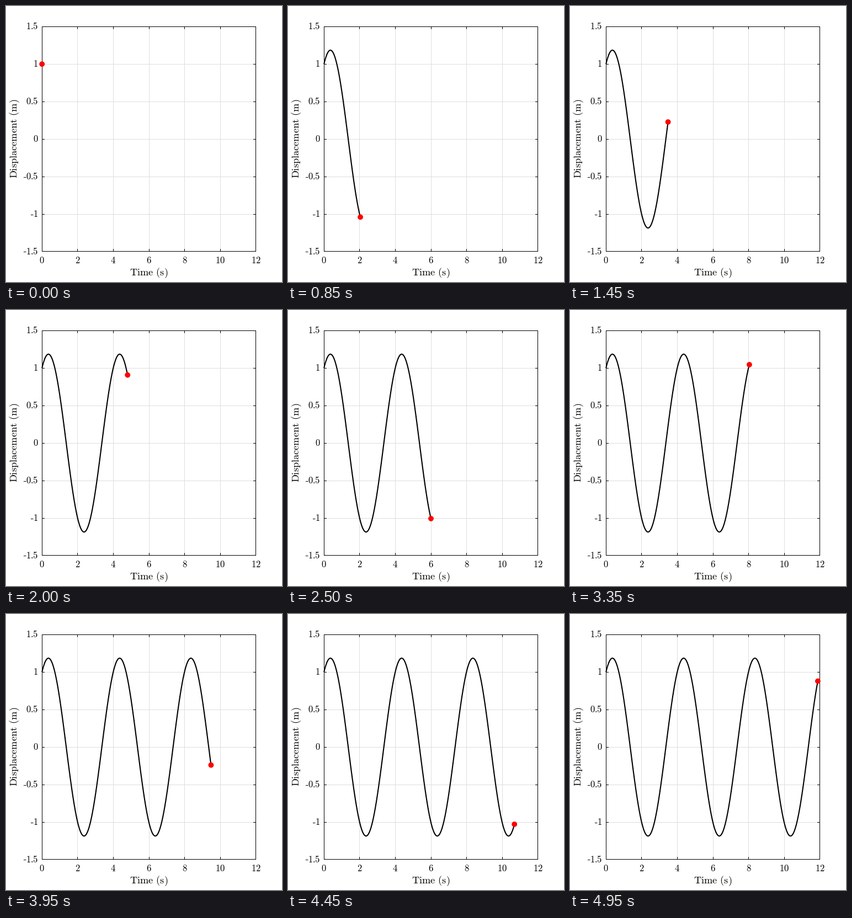
Write a matplotlib script that moves like this. It is 500 by 500 pixels and loops after 5000 ms.

```python
import numpy as np
import matplotlib.pyplot as plt
from matplotlib.animation import FuncAnimation
from matplotlib.patches import Circle

SIZE, DPI = 500, 100
FRAMES, INTERVAL = 100, 50
PX = 72 / DPI                      # one pixel in points

LEFT, RIGHT = 65.2, 452.8
TOP, BOTTOM = 37.25, 444.95
T_MAX, Y_MAX = 12, 1.5
DT = T_MAX / FRAMES
SUBSTEPS = 8                       # curve points per frame
OMEGA, X0, V0 = 1.5725, 1.0, 1.0   # free vibration of a mass on a spring

TICK = 4
TICK_FONT, LABEL_FONT = 12, 13.2
GRID = "#dedede"

plt.rcParams["mathtext.fontset"] = "cm"
plt.rcParams["path.simplify"] = False


def displacement(t):
    return X0 * np.cos(OMEGA * t) + V0 / OMEGA * np.sin(OMEGA * t)


def to_x(t):
    return LEFT + (RIGHT - LEFT) * t / T_MAX


def to_y(value):
    return TOP + (BOTTOM - TOP) * (Y_MAX - value) / (2 * Y_MAX)


def pixel(v):
    """Centre of the pixel that holds v."""
    return np.floor(v + 1e-6) + 0.5


fig = plt.figure(figsize=(SIZE / DPI, SIZE / DPI), dpi=DPI, facecolor="white")
ax = fig.add_axes([0, 0, 1, 1])
ax.set_xlim(0, SIZE)
ax.set_ylim(SIZE, 0)
ax.axis("off")


def rule(x0, y0, x1, y1, color="black", z=2):
    ax.plot([x0, x1], [y0, y1], color=color, lw=PX, zorder=z,
            solid_capstyle="butt", snap=False)


def roman(x, y, words, size, **kw):
    body = r"\hspace{0.38}".join(r"\mathrm{%s}" % w for w in words.split())
    ax.text(x, y, f"${body}$", fontsize=size, color="black",
            va="baseline", **kw)


def draw_axes():
    x0, x1, y0, y1 = (pixel(v) for v in (LEFT, RIGHT, TOP, BOTTOM))

    for t in range(0, T_MAX + 1, 2):
        x = pixel(to_x(t))
        if 0 < t < T_MAX:
            rule(x, y0, x, y1, GRID, 1)
        rule(x, y0, x, y0 + TICK + 0.5)
        rule(x, y1, x, y1 - TICK - 0.5)
        roman(to_x(t), 466.5, str(t), TICK_FONT, ha="center")

    em = TICK_FONT / PX
    for value in np.arange(-Y_MAX, Y_MAX + 0.1, 0.5):
        y = pixel(to_y(value))
        if abs(value) < Y_MAX:
            rule(x0, y, x1, y, GRID, 1)
        rule(x0, y, x0 + TICK + 0.5, y)
        rule(x1, y, x1 - TICK - 0.5, y)

        digits = f"{abs(value):g}"
        base = to_y(value) + 4.6
        start = 58.7 - em * (0.5 if len(digits) == 1 else 1.278)
        roman(start - 1, base, digits, TICK_FONT, ha="left")
        if value < 0:
            dash = pixel(base - 3.6)
            rule(start - 5.4, dash, start - 1, dash)

    for y in (y0, y1):
        rule(x0 - 0.5, y, x1 + 0.5, y)
    for x in (x0, x1):
        rule(x, y0 - 0.5, x, y1 + 0.5)

    roman(258.4, 488, "Time (s)", LABEL_FONT, ha="center")
    roman(20, 240.2, "Displacement (m)", LABEL_FONT, ha="center",
          rotation=90, rotation_mode="anchor")


draw_axes()
curve, = ax.plot([], [], color="black", lw=1.5, zorder=3, snap=False,
                 solid_joinstyle="round", solid_capstyle="butt")
dot = ax.add_patch(Circle((0, 0), 4.9, facecolor="red", edgecolor="none",
                          zorder=4))


def update(frame):
    t = np.linspace(0, frame * DT, frame * SUBSTEPS + 1)
    x, y = to_x(t), to_y(displacement(t))
    curve.set_data(x, y)
    dot.center = x[-1], y[-1]
    return curve, dot


anim = FuncAnimation(fig, update, frames=FRAMES, interval=INTERVAL,
                     repeat=True, repeat_delay=0)
plt.show()
```
